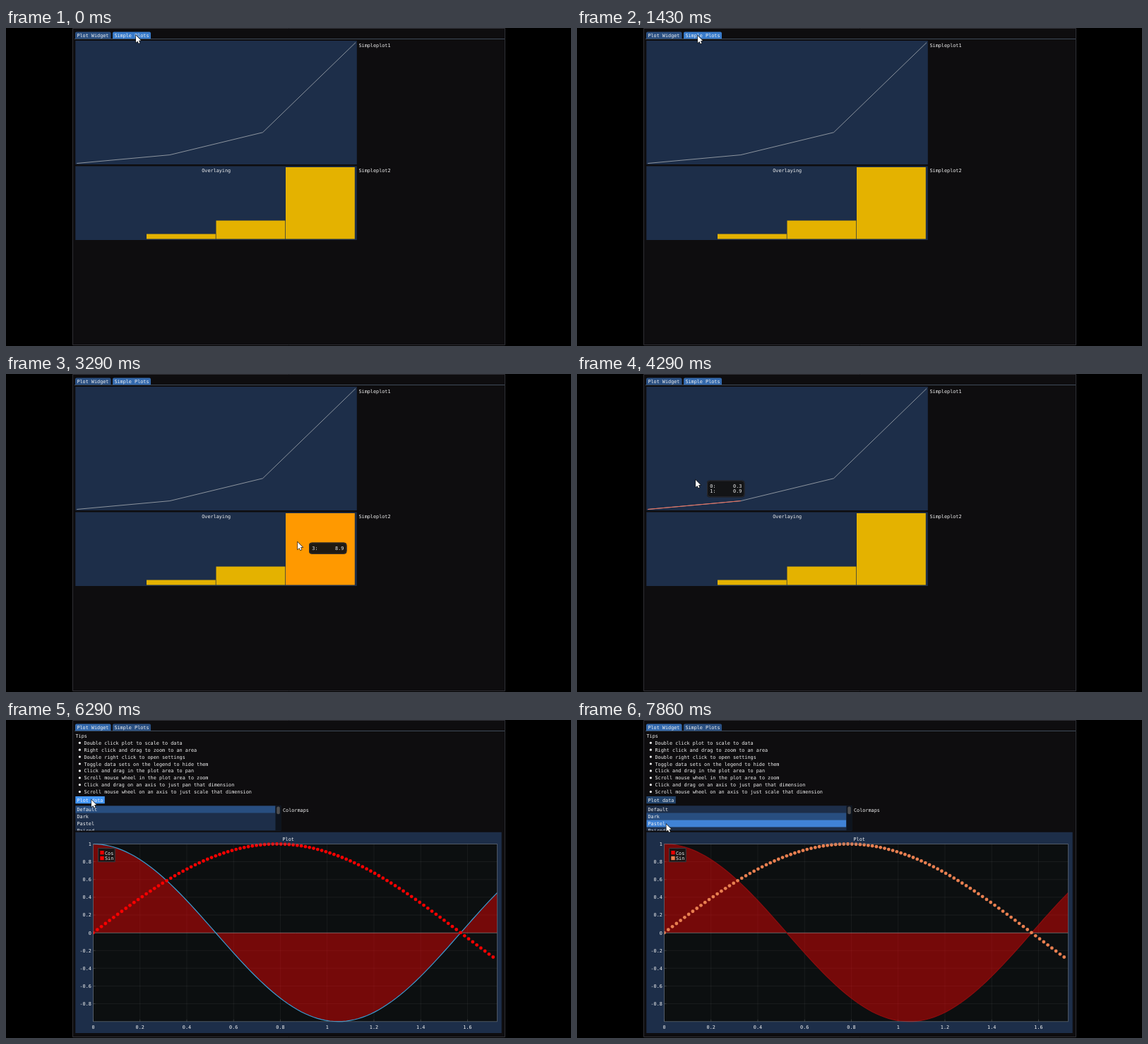
Recreate the animation shown at these times as an HTML page with a canvas. Size 800 by 450 pixels, loop 8000 ms.

```html
<!DOCTYPE html>
<html lang="en">
<head>
<meta charset="utf-8">
<title>Plot demo</title>
<style>
  html, body { margin: 0; width: 100%; height: 100%; overflow: hidden; background: #000; }
  canvas { display: block; width: 100%; height: 100%; }
</style>
</head>
<body>
<canvas id="stage" width="800" height="450"></canvas>
<script>
const ctx = document.getElementById('stage').getContext('2d');
const LOOP = 8000, FPS = 7, CHAR = 4.1;

const color = {
  window: '#0e0d0f', border: '#2f2f35', frame: '#1d2e49', plotBg: '#0c0f10',
  tab: '#2a4f81', tabActive: '#3369ad', tabHover: '#387bcb',
  button: '#23446c', buttonHover: '#4296fa',
  row: '#284e80', rowHover: '#4083d6',
  text: '#f2f2f2', line: '#8c949e', lineHover: '#f06e5a',
  bar: '#e4b200', barHover: '#ff9900'
};

// Cursor path: step, x, y
const path = [
  [0, 184, 10.5], [1, 178, 10], [2, 161, 10], [3, 147, 10.5], [4, 143.5, 11], [7, 146, 11],
  [9, 166, 10], [11, 176, 12], [13, 203, 95], [15, 225, 178], [18, 330, 135],
  [20, 455, 85], [21, 469, 125], [22, 440, 200], [23, 413, 238], [24, 402, 250],
  [26, 340, 280], [28, 245, 289], [29, 200, 240], [30, 168, 150], [31, 150, 60],
  [32, 140, 13], [34, 137, 15], [36, 134, 28], [39, 125, 92], [41, 121, 112],
  [44, 121, 113], [46, 121, 114], [48, 122, 126], [50, 124, 136],
  [53, 124.5, 138], [55, 126.5, 147.5]
];
const TO_WIDGET = 3, TO_SIMPLE = 10, TO_WIDGET_AGAIN = 33, PLOT_CLICK = 42, DARK_CLICK = 51;

const tips = [
  'Double click plot to scale to data',
  'Right click and drag to zoom to an area',
  'Double right click to open settings',
  'Toggle data sets on the legend to hide them',
  'Click and drag in the plot area to pan',
  'Scroll mouse wheel in the plot area to zoom',
  'Click and drag on an axis to just pan that dimension',
  'Scroll mouse wheel on an axis to just scale that dimension'
];
const maps = ['Default', 'Dark', 'Pastel', 'Paired'];
const values = [0.3, 0.9, 2.5, 8.9];

function cursorAt(step) {
  let i = 0;
  while (i < path.length - 2 && path[i + 1][0] <= step) i++;
  const [s0, x0, y0] = path[i], [s1, x1, y1] = path[i + 1];
  const u = Math.min(1, (step - s0) / (s1 - s0));
  return { x: x0 + (x1 - x0) * u, y: y0 + (y1 - y0) * u };
}

const inside = (p, x, y, w, h) => p.x >= x && p.x < x + w && p.y >= y && p.y < y + h;

function rect(x, y, w, h, fill, r = 0) {
  ctx.fillStyle = fill;
  ctx.beginPath();
  ctx.roundRect(x, y, w, h, r);
  ctx.fill();
}

function outline(x, y, w, h, stroke, r = 0) {
  ctx.strokeStyle = stroke;
  ctx.lineWidth = 1;
  ctx.beginPath();
  ctx.roundRect(x, y, w, h, r);
  ctx.stroke();
}

function polyline(points, stroke, width = 1) {
  ctx.strokeStyle = stroke;
  ctx.lineWidth = width;
  ctx.beginPath();
  points.forEach(([x, y]) => ctx.lineTo(x, y));
  ctx.stroke();
}

// y is the middle of the capitals
function text(str, x, y, align = 'left') {
  ctx.font = '6.81px "DejaVu Sans Mono", monospace';
  ctx.textRendering = 'geometricPrecision';
  ctx.fillStyle = color.text;
  const w = str.length * CHAR;
  const left = align === 'right' ? x - w : align === 'center' ? x - w / 2 : x;
  ctx.fillText(str, left, y + 2.5);
}

function clipped(x, y, w, h, draw) {
  ctx.save();
  ctx.beginPath();
  ctx.rect(x, y, w, h);
  ctx.clip();
  draw();
  ctx.restore();
}

function drawTab(label, x, w, active, mouse) {
  const hover = inside(mouse, x, 5, w, 10.5);
  rect(x, 5.5, w, 9.7, hover ? color.tabHover : active ? color.tabActive : color.tab, [2, 2, 0, 0]);
  text(label, x + 2.4, 10.7);
}

function drawShell(widgetPage, mouse) {
  rect(0, 0, 800, 450, '#000');
  rect(94, 0, 613, 449, color.window);
  outline(94.5, 0.5, 612, 448, color.border);
  rect(97, 15, 609, 1, '#3f4a58');
  drawTab('Plot Widget', 98, 50.5, widgetPage, mouse);
  drawTab('Simple Plots', 151, 54, !widgetPage, mouse);
}

function drawTooltip(mouse, rows) {
  const x = mouse.x + 16, y = mouse.y + 0.5, h = 8.5 + rows.length * 7.7;
  rect(x, y, 53.5, h, 'rgba(20,20,20,0.95)', 4);
  outline(x + 0.5, y + 0.5, 52.5, h - 1, '#2c2c32', 4);
  rows.forEach((i, n) => text(i + ':' + String(values[i]).padStart(9), x + 4.3, y + 7.7 + n * 7.7));
}

function drawSimplePage(mouse) {
  const overLine = inside(mouse, 98, 18, 399, 175);
  const overBars = inside(mouse, 98, 195, 399, 105);

  rect(98.3, 18, 398.5, 175, color.frame);
  const points = values.map((v, i) => [100.3 + i * 131.6, 191.5 - (v - 0.3) / 8.6 * 171]);
  const seg = Math.max(0, Math.min(2, Math.floor((mouse.x - 100.3) / 131.6)));
  polyline(points, color.line);
  if (overLine) polyline(points.slice(seg, seg + 2), color.lineHover);
  text('Simpleplot1', 499.5, 24);

  rect(98.3, 195.4, 398.5, 104.6, color.frame);
  const bar = Math.max(0, Math.min(3, Math.floor((mouse.x - 100.5) / 98.5)));
  values.forEach((v, i) => {
    const h = (v - 0.3) / 8.6 * 101.5;
    const fill = overBars && bar === i ? color.barHover : color.bar;
    if (h) rect(100.5 + i * 98.5, 298.5 - h, 97.8, h, fill);
  });
  text('Overlaying', 297.7, 201.3, 'center');
  text('Simpleplot2', 499.5, 201.3);

  if (overLine) drawTooltip(mouse, [seg, seg + 1]);
  if (overBars) drawTooltip(mouse, [bar]);
}

function drawList(mouse, selected) {
  rect(98.3, 121.3, 291, 35.2, color.frame);
  rect(381.5, 121.3, 7.8, 35.2, '#0e141e');
  rect(383.3, 122.5, 4.5, 10.8, '#4f4f50', 2);
  clipped(98.3, 121.3, 283, 35.2, () => maps.forEach((name, i) => {
    const y = 121.6 + i * 9.95;
    if (inside(mouse, 98, y, 283, 9.95)) rect(98.3, y, 283, 9.95, color.rowHover);
    else if (i === selected) rect(98.3, y, 283, 9.95, color.row);
    text(name, 100.5, y + 5.2);
  }));
  text('Colormaps', 392, 127);
}

function drawSeries(X, Y, dark) {
  const xs = Array.from({ length: 100 }, (_, i) => i * 3.14 / 180);
  const cos = xs.map(x => [X(x), Y(Math.cos(3 * x))]);

  ctx.fillStyle = 'rgba(255,0,0,0.43)';
  ctx.beginPath();
  ctx.moveTo(X(0), Y(0));
  cos.forEach(([x, y]) => ctx.lineTo(x, y));
  ctx.lineTo(X(xs[99]), Y(0));
  ctx.fill();
  polyline([[X(0), Y(0) + 0.2], [X(xs[99]), Y(0) + 0.2]], 'rgba(150,150,150,0.55)');
  polyline(cos, dark ? '#8c0c0e' : '#3a9bd0', 1.2);

  ctx.fillStyle = dark ? '#e87f50' : '#f80000';
  xs.slice(0, 99).forEach(x => {
    ctx.beginPath();
    ctx.arc(X(x), Y(Math.sin(2 * x)), 2.4, 0, 7);
    ctx.fill();
  });
}

function drawLegend(dark) {
  rect(130, 181, 24.5, 20, 'rgba(20,20,20,0.94)');
  outline(130.5, 181.5, 23.7, 19.2, '#3c3c42');
  rect(133.3, 185, 5.4, 5.4, '#e80000');
  rect(133.3, 192.8, 5.4, 5.4, dark ? '#e87f50' : '#f80000');
  text('Cos', 140, 188);
  text('Sin', 140, 195.7);
}

function drawPlot(plotted, dark) {
  rect(98.3, 158.7, 603.4, 284.3, color.frame);
  text('Plot', 399.7, 168.7, 'center');

  const left = plotted ? 123.5 : 119.5, right = 695.5, top = 175.5, bottom = 426.7;
  const xMax = plotted ? 99 * 3.14 / 180 : 1, yMin = plotted ? -1 : 0;
  const dx = plotted ? 0.2 : 0.1;
  const X = x => left + x / xMax * (right - left);
  const Y = y => bottom - (y - yMin) / (1 - yMin) * (bottom - top);
  const label = v => String(+v.toFixed(1));

  rect(left, top, right - left, bottom - top, color.plotBg);
  for (let i = 0; i * dx <= xMax + 1e-6; i++) {
    const x = X(i * dx);
    rect(x - 0.5, top, 1, bottom - top, 'rgba(255,255,255,0.055)');
    rect(x - 0.4, bottom - 3, 0.8, 3, 'rgba(255,255,255,0.18)');
    text(label(i * dx), x, 434, 'center');
  }
  for (let i = 0; i < (plotted ? 10 : 11); i++) {
    const v = 1 - i * dx, y = Y(v);
    rect(left, y - 0.5, right - left, 1, 'rgba(255,255,255,0.055)');
    rect(left, y - 0.4, 3, 0.8, 'rgba(255,255,255,0.18)');
    text(label(v), left - 2.6, y, 'right');
  }
  if (plotted) clipped(left, top - 3, right - left, bottom - top + 5, () => drawSeries(X, Y, dark));
  outline(left, top, right - left, bottom - top, 'rgba(130,138,150,0.5)');
  if (plotted) drawLegend(dark);
}

function drawWidgetPage(mouse, plotted, dark) {
  text('Tips', 98.5, 22.3);
  tips.forEach((tip, i) => {
    const y = 32.3 + i * 9.9;
    ctx.fillStyle = color.text;
    ctx.beginPath();
    ctx.arc(104.4, y, 1.6, 0, 7);
    ctx.fill();
    text(tip, 110.5, y);
  });
  const hover = inside(mouse, 98, 108, 42, 10.5);
  rect(98.3, 108, 41.5, 10.2, hover ? color.buttonHover : color.button);
  text('Plot data', 100.5, 113.3);
  drawList(mouse, dark ? 1 : 0);
  drawPlot(plotted, dark);
}

function drawCursor({ x, y }) {
  const shape = [[0, 0], [0, 10], [2.3, 7.9], [3.9, 11.3], [5.5, 10.6], [4, 7.3], [7, 7.1]];
  ctx.beginPath();
  shape.forEach(([px, py]) => ctx.lineTo(x + px, y + py));
  ctx.closePath();
  ctx.lineWidth = 1.2;
  ctx.strokeStyle = '#111';
  ctx.stroke();
  ctx.fillStyle = '#fff';
  ctx.fill();
}

function draw(now) {
  const step = Math.floor(((now % LOOP) + 5) * FPS / 1000) % (LOOP * FPS / 1000);
  const mouse = cursorAt(step);
  const widgetPage = step >= TO_WIDGET && step < TO_SIMPLE || step >= TO_WIDGET_AGAIN;
  drawShell(widgetPage, mouse);
  if (widgetPage) drawWidgetPage(mouse, step >= PLOT_CLICK, step >= DARK_CLICK);
  else drawSimplePage(mouse);
  drawCursor(mouse);
}

const start = performance.now();
function tick() {
  draw(performance.now() - start);
  requestAnimationFrame(tick);
}
tick();
</script>
</body>
</html>
```
